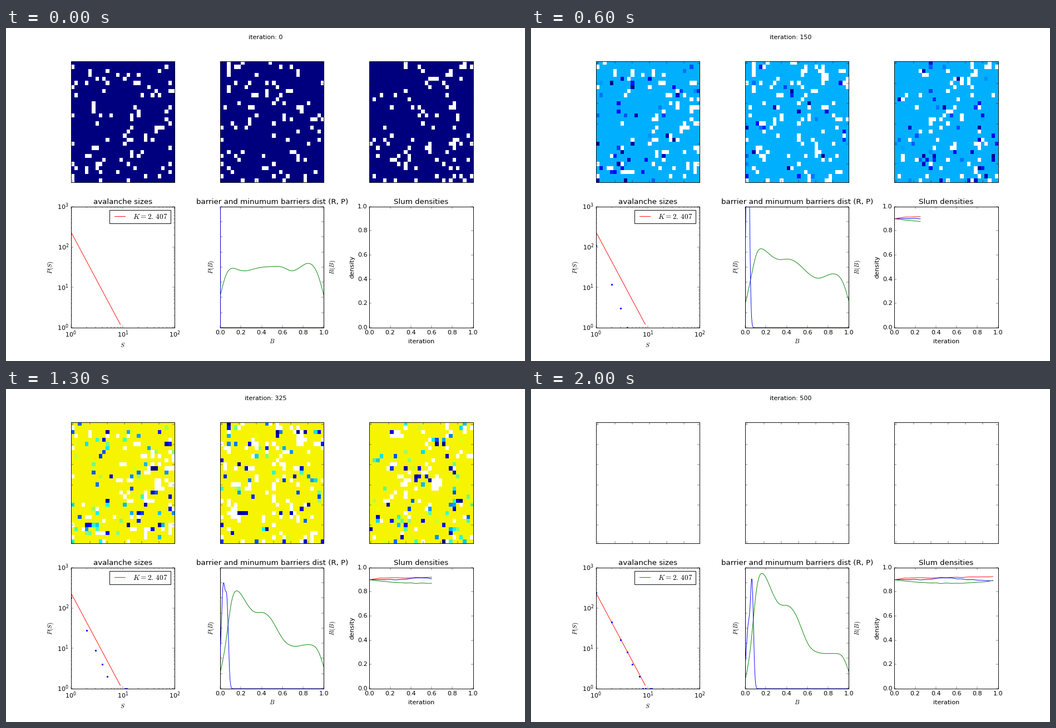
Write a matplotlib script that moves like this. It is 933x600 px and loops after 2.1 s.

```python
import numpy as np
import matplotlib.pyplot as plt
from matplotlib.animation import FuncAnimation

plt.style.use("classic")
plt.rcParams.update({"font.family": "DejaVu Sans", "figure.facecolor": "white"})

N, STEP, LAST = 30, 25, 500
FRAMES = LAST // STEP + 1
K = 2.407
rng = np.random.default_rng(12)


def density_curves():
    """Slow trends with a little noise, all starting at 0.9."""
    x = np.arange(FRAMES - 1) / (FRAMES - 1)
    trends = {
        "b": .02 * np.exp(-((x - .52) / .2) ** 2) - .01 * x,
        "g": -.11 * x + .105 * x ** 2,
        "r": .014 * (1 - np.exp(-x / .07)) + .008 * x,
    }
    noise = {c: rng.normal(0, .002, x.size) * (x > 0) for c in trends}
    return x, {c: .9 + trends[c] + noise[c] for c in trends}


def random_regions():
    """Small ellipses that start to empty out at some iteration."""
    rows, cols = np.mgrid[:N, :N]
    regions = []
    for slum in np.repeat(range(3), 5):
        (r, c), (h, w) = rng.uniform(2, N - 3, 2), rng.uniform(.8, 2.6, 2)
        mask = ((rows - r) / h) ** 2 + ((cols - c) / w) ** 2 < 1
        regions.append((slum, mask, rng.uniform(60, 340)))
    return regions


def pick(weights):
    p = weights.ravel()
    return np.unravel_index(rng.choice(p.size, p=p / p.sum()), weights.shape)


def simulate(x, density):
    """Agents leave crowded or unstable cells for vacancies in any slum."""
    empty = np.zeros((3, N, N), bool)
    for slum in empty:
        slum.flat[rng.choice(N * N, N * N // 10, replace=False)] = True
    born = np.zeros((3, N, N))
    regions = random_regions()
    history = [np.where(empty, np.nan, 0.0)]
    for t in range(1, LAST + 1):
        pull = np.zeros((3, N, N), bool)
        for s, mask, start in regions:
            if t > start:
                pull[s] |= mask
        goal = [N * N * (1 - np.interp(t / LAST, x, d)) for d in density.values()]
        gap = goal - empty.sum(axis=(1, 2)) + rng.normal(0, 2.5, 3)
        src, dst = gap.argmax(), gap.argmin()

        target = pick(empty[dst] * np.where(pull[dst], .1, 1))
        vac = empty[src]
        near = sum(np.roll(vac, d, axis) for d in (-1, 1) for axis in (0, 1))
        leave = .02 + .06 * near + .4 * (born[src] > 0) + 2 * pull[src]
        source = pick(leave * ~vac)

        empty[src][source] = True
        empty[dst][target] = False
        born[dst][target] = t
        if t % STEP == 0:
            history.append(np.where(empty, np.nan, t - born))
    history[-1][:] = np.nan
    return history


def power_law(s):
    return 238 * s ** -K


def avalanches(t):
    """Counts grow towards the power law, large sizes later."""
    s = np.r_[1.0:6, 7:10, 11:13]
    count = np.floor(power_law(s) * (t / LAST) ** (.65 * s ** .7) + 1e-9)
    count[s > 10] = t > 300
    return s[count > 0], count[count > 0]


def bell(x, height, centre, width):
    return height * np.exp(-((x - centre) / width) ** 2 / 2)


def minimum_barriers(x, t):
    """A spike at zero that widens and sinks, then a second peak beside it."""
    first = bell(x, 330 * (100 / max(t, 1)) ** 1.15,
                 .032 * (1 - np.exp(-t / 100)),
                 .0004 + .022 * (1 - np.exp(-t / 140)))
    return first + bell(x, 75 * np.clip((t - 175) / 200, 0, 1), .067, .014)


def spline(knots, values, x):
    """Natural cubic spline through the knots."""
    n = len(knots)
    poly = np.column_stack([np.ones(n), knots])
    cube = np.abs(knots[:, None] - knots) ** 3
    system = np.block([[cube, poly], [poly.T, np.zeros((2, 2))]])
    w = np.linalg.solve(system, np.append(values, [0, 0]))
    return np.abs(x[:, None] - knots) ** 3 @ w[:n] + w[n] + w[n + 1] * x


x, density = density_curves()
history = simulate(x, density)

# Barrier distribution at both ends of the run, percent of the axis height
b = np.linspace(0, 1, 1001)
knots = np.array([0, .05, .11, .17, .25, .33, .41, .5, .6, .7, .88, .95, 1])
first = spline(knots, [26, 42, 49, 48, 47, 48.6, 50, 50.5, 50, 47, 52.3, 42, 26.6], b)
final = spline(knots, [7, 33, 82, 95, 82, 70, 68.6, 59, 38, 30, 29, 25, 14], b)

fig = plt.figure(figsize=(13.99501, 9.00001), dpi=200 / 3)
axes = fig.subplots(2, 3)
fig.subplots_adjust(left=.125, right=.9, bottom=.1, top=.9, wspace=.44, hspace=.2)
title = fig.suptitle("iteration: 0")

images = []
for ax, grid in zip(axes[0], history[0]):
    images.append(ax.imshow(grid, cmap="jet", vmin=0, vmax=LAST,
                            interpolation="nearest", aspect="auto"))
    ax.set(xticks=range(0, N, 5), yticks=range(0, N, 5),
           xticklabels=[], yticklabels=[])

sizes, bars, dens = axes[1]

s = np.arange(1.0, 10)
sizes.loglog(s, power_law(s), "r", label=r"$K=2.\,407$")
dots, = sizes.plot([], [], "b.")
sizes.set(xlim=(1, 100), ylim=(1, 1000), title="avalanche sizes",
          xlabel="$S$", ylabel="$P(S)$")
sizes.legend(loc="upper right")

twin = bars.twinx()
dist, = twin.plot(b, first, "g")
low, = twin.plot(b, 0 * b, "b", zorder=3)
for ax, name in ((bars, "$P(B)$"), (twin, "$R(B)$")):
    ax.set(xlim=(0, 1), ylim=(0, 100), yticks=np.linspace(0, 100, 9),
           yticklabels=[], ylabel=name)
bars.set(xlabel="$B$", title="barrier and minumum barriers dist (R, P)")

lines = [dens.plot([], [], c)[0] for c in density]
dens.set(xlim=(0, 1), ylim=(0, 1), title="Slum densities", ylabel="density")
dens.set_xlabel("iteration", labelpad=7)


def update(k):
    t = k * STEP
    title.set_text(f"iteration: {t}")
    for image, grid in zip(images, history[k]):
        image.set_data(grid)
    dots.set_data(*avalanches(t))
    low.set_ydata(minimum_barriers(b, t))
    dist.set_ydata(first + (final - first) * (t / LAST) ** .85)
    for line, d in zip(lines, density.values()):
        line.set_data(x[:k], d[:k])
    return [title, *images, dots, low, dist, *lines]


anim = FuncAnimation(fig, update, frames=FRAMES, interval=100, repeat=True,
                     repeat_delay=0, blit=False)
plt.show()
```
